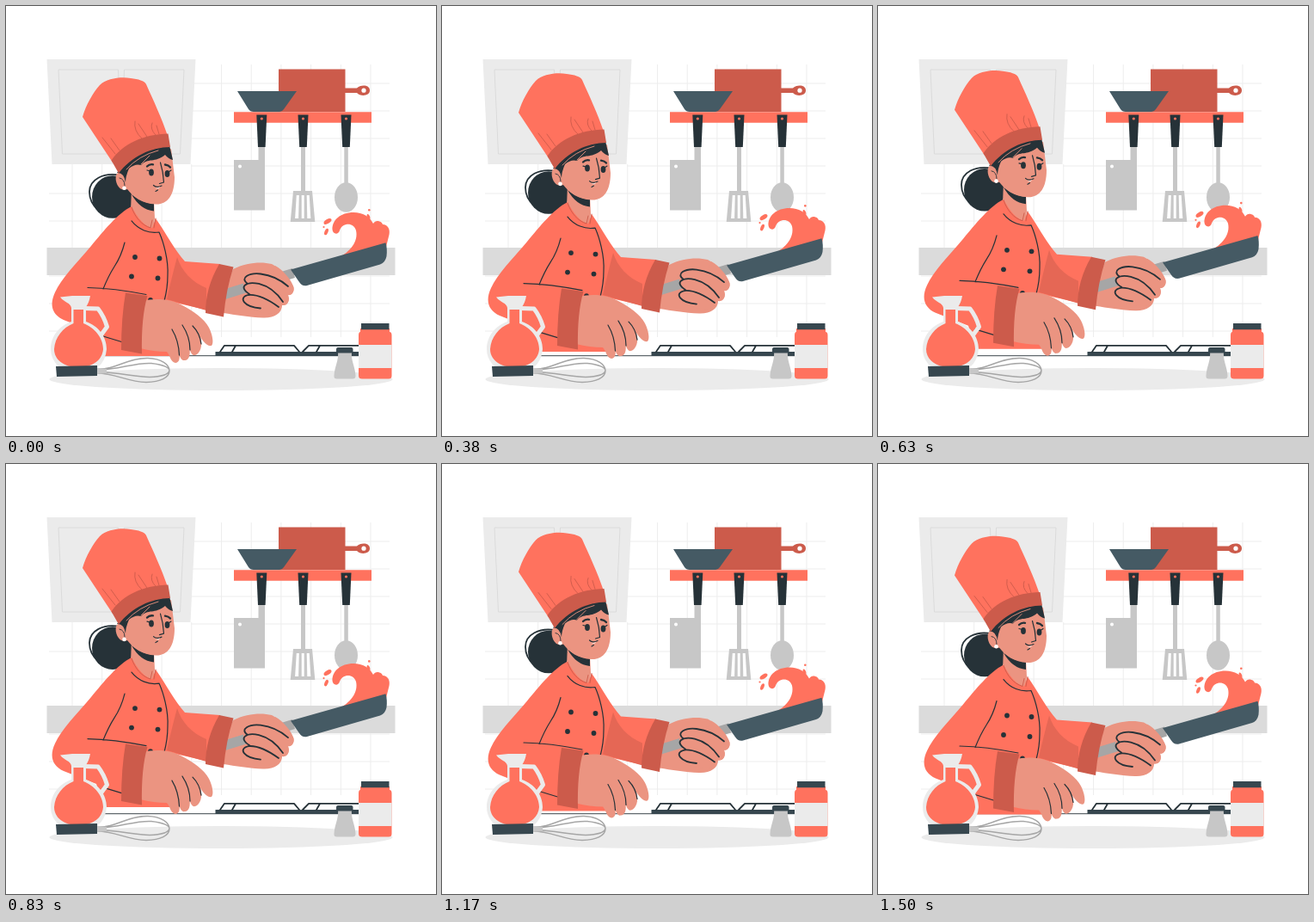
These frames come from a looping animation (500x500 px, 1540 ms). An HTML page:

```html
<!DOCTYPE html>
<html lang="en">
<head>
<meta charset="utf-8">
<title>Chef with a pan</title>
<style>
  html, body { margin: 0; width: 100%; height: 100%; overflow: hidden; background: #fff; }
  svg { display: block; width: 100vw; height: 100vh; }
  .red { fill: #ff725e; } .brick { fill: #cc5b4b; } .shade { fill: #e56755; }
  .skin { fill: #eb9481; } .ink { fill: #263238; } .slate { fill: #455a64; }
  .lid { fill: #37474f; } .pale { fill: #ebebeb; } .band { fill: #dbdbdb; }
  .steel { fill: #c7c7c7; } .white { fill: #fff; }
  .line { fill: none; stroke: #263238; stroke-width: 1.2; stroke-linecap: round; stroke-linejoin: round; }
  .bold { stroke-width: 1.8; }
  .seam { fill: none; stroke: #cc5b4b; stroke-width: .9; stroke-linecap: round; }
  .wire { fill: none; stroke: #a6a6a6; stroke-width: 1.5; }
</style>
</head>
<body>
<svg viewBox="0 0 500 500">
  <!-- wall -->
  <path id="tiles" fill="none" stroke="#ededed"/>
  <path class="band" d="M47.500 281h405v32h-405z"/>
  <path class="pale" d="M47.500 62H220.500L214.500 184H53.500z"/>
  <path fill="none" stroke="#dbdbdb" d="M61 74H130.500L134 172H65.500zM137.500 74H207L202.500 172H134z"/>

  <!-- shelf -->
  <path class="brick" d="M317 73.500h77.500v22H408C412 91 423 91 423 98S412 105.500 408 101H394.500v22H317z"/>
  <circle class="white" cx="416" cy="98.200" r="2.600"/>
  <path class="slate" d="M269 99H338L323 120Q321 123 318 123H288Q284 123 282 120z"/>
  <path class="red" d="M265 123.300h160v12.400h-160z"/>
  <path class="steel" d="M293.500 162H301V237.500H265V179H293.500zM343 162h5v53h8l3.300 36h-28.600l3.300-36h9zM393.300 162h4.500v45h-4.500z"/>
  <ellipse class="steel" cx="395.500" cy="222.500" rx="13.500" ry="17.200"/>
  <circle class="white" cx="272" cy="186.500" r="2"/>
  <path class="white" d="M337.800 220h3l-.7 27h-4zM343.700 220h3v27h-3zM349.700 220h3l1.600 27h-4z"/>
  <g id="grips"></g>

  <!-- counter -->
  <ellipse class="pale" cx="250" cy="434" rx="199.500" ry="13"/>
  <path class="line" stroke-linecap="butt" style="stroke-width:.9" d="M112 406.700H412"/>

  <g id="chef">
    <!-- bun and neck -->
    <ellipse class="ink" cx="124" cy="222" rx="24" ry="24.800"/>
    <path class="line bold" d="M133 197C113 193 97 202 97 216C97 225 101 232 107 237"/>
    <path class="skin" d="M146 212L172 226L173 247L171 262L160 258L145 238z"/>
    <path class="ink" d="M146 219Q158 229 172 230V238.500Q156 237 146 219z"/>

    <!-- jacket -->
    <path class="red" d="M146 233C130 241 113 262 99 279C82 299 64 317 57 333C50 348 54 359 67 365L105 380L113 407H190L188 343L232 353L249 300L208 297C197 285 186 264 174 247L170 258C161 256 153 247 146 233z"/>
    <path class="shade" d="M199 292C204 308 216 321 233 328V354L187 341Q192 318 199 292z"/>
    <path class="seam" d="M146 234C150 246 158 255 168 258L170 249M174 247L172 258"/>
    <path class="line" d="M146 250C154 260 166 265 178 263C183 274 189 295 188 313Q188 328 184 343M138 275Q134 291 126 303Q119 314 113 329M95 327.500C116 328 140 331 163 335.500M113 384L136 391"/>
    <g class="ink" id="buttons"></g>

    <!-- splash -->
    <path class="red" d="M386 293C400 286 410 274 407 261C404 251 391 252 388 261C386 267 380 265 379.500 260C379 249 389 240 404 240C415 240 423 245 427 253C430 247 438 251 438 254C444 254 447 260 445.500 266L442 280z"/>
    <g class="red">
      <ellipse cx="374" cy="250.500" rx="5" ry="2.500" transform="rotate(-32 374 250.500)"/>
      <ellipse cx="372.500" cy="262.500" rx="2" ry="4" transform="rotate(22 372.500 262.500)"/>
      <ellipse cx="421.500" cy="245" rx="1.600" ry="3.200" transform="rotate(-20 421.500 245)"/>
      <circle cx="422.300" cy="237.300" r="1.300"/>
      <circle cx="369.500" cy="257" r="1.100"/>
    </g>

    <!-- pan hand -->
    <path class="skin" d="M253 331L264 306C280 298 297 297 309 300C318 305 329 315 334 326C336 332 332 337 328 336C331 342 327 349 321 348C321 357 312 363 299 362.500C283 362 266 359 253 357z"/>
    <path fill="#a6a6a6" d="M255 329L333 305L336 316L255 341z"/>
    <path class="slate" d="M331 306.500L441.500 275.200Q443.500 282 442.500 291Q441 298.500 435 300.500L350 325Q344 326 341 321z"/>
    <path class="skin" d="M278 319C281 308 297 308 310 309L313 302C322 307 331 317 334.500 327C335.500 333 332 337 327 336C331 343 327 349 321 348C319 354 313 360 300 357C285 356 273 349 274 343C274 338 278 335 280 334C275 329 275 323 278 319z"/>
    <path class="line bold" d="M281 323C271 316 283 310 296 311.500C309 313 320 319 328 326M283 335C269 326 280 320 294 323C306 326 316 335 322 344M317 350C306 342 294 335 282 336C269 339 277 350 296 351.500"/>
    <path class="brick" d="M248 300L264.500 303.500Q256 329 253 361.500L232 357Q232 327 248 300z"/>

    <!-- resting hand -->
    <path class="skin" d="M158 343C176 339 193 341 205 348C217 354 231 364 236 374C240 382 242 392 239 395C234 396 230 391 226 385C229 395 226 404 220 406C216 407 214 402 213 396C215 405 213 412 208 412C204 413 202 408 201 403C203 410 201 415 197 415C191 414 191 406 187 402Q172 402 156 398z"/>
    <path class="line" d="M193 376C199 386 201 395 201.500 406M205 371C211 380 214 389 214 400M217 372C222 377 226 385 227 393"/>
    <path class="brick" d="M139 333.500L164.500 337Q157 362 158 404.500L134 400Q134 362 139 333.500z"/>

    <!-- head -->
    <path class="skin" d="M138 184L192 166L196 199C196 220 188 231 174 230.500C158 230 148 222 141 213C132 217 126 205 128 197C130 191 136 193 139 197z"/>
    <path class="ink" d="M129 194L145 172L190 162L194 179Q189 178 185 173C173 183 165 176 157 185Q150 183 143 189Q139 198 139 205Q137 193 129 194z"/>
    <path class="seam" style="stroke:#eb9481" d="M140 190Q154 174 177 168M157 184L167 174"/>
    <path class="line" style="stroke-width:.9" d="M132 200Q138 201 138 209"/>
    <circle class="white" cx="137.500" cy="211.800" r="2.300"/>
    <ellipse class="ink" cx="169" cy="193.500" rx="2.900" ry="4"/>
    <ellipse class="ink" cx="187.500" cy="195" rx="2.900" ry="4"/>
    <path class="line bold" style="stroke-width:2.300" d="M164 186.500Q167 183.500 171 184.300M185 184.500Q189 185 191 187.500"/>
    <path class="line" d="M164 191L168 192M189 193L192 191M179.500 182Q183 193 183.500 205L178.500 206.500M171.500 208.500Q175 212 181 209M174 215.500L176.500 214"/>
    <path class="white" d="M173 211Q177 212.500 179 210Q178 214 173 211z"/>

    <!-- hat -->
    <path class="red" d="M124 182L89 129C93 115 101 101 109 92C117 84 134 82 145 84C154 85 161 87 163 91C171 109 181 130 188 151z"/>
    <path class="brick" d="M122.500 179.500C136 160 160 149 188.500 148.500L191 164C169 164 146 175 131 194.500z"/>
    <path class="seam" d="M112 153L127 172M122 154L132 168M150 134Q148 145 158 154M154 137L164 152M170 136Q167 143 174 150M175 139L178 149"/>
  </g>

  <!-- hob -->
  <path class="lid" d="M243.500 402H412v5H243.500z"/>
  <path class="line bold" stroke-linecap="butt" d="M249 402L254 394.800H335L341 402M263 402L267 395M345 402L352 394.800H411M361 402L365 395"/>

  <!-- jar and shaker -->
  <path class="steel" d="M386 402H402C401 413 406 419 406.500 430Q406.500 433.500 403 433.500H385Q381 433.500 381.500 430C382 419 387 413 386 402z"/>
  <rect class="lid" x="384" y="397" width="19.500" height="6.500" rx="2"/>
  <path class="red" d="M412 375H446V379Q448.500 379 448.500 383V430Q448.500 433.500 445 433.500H414Q410 433.500 410 430V383Q410 379 412 379z"/>
  <path class="pale" d="M410 394h38.500v27H410z"/>
  <path class="lid" d="M413 369h32.500v7.200H413z"/>

  <!-- jug -->
  <path fill="none" stroke="#ebebeb" stroke-width="5" stroke-linejoin="round" d="M91 351.500L107 352Q114 361 117.500 373L108 386"/>
  <path class="pale" d="M63 338.500L77 337H98C97 343 95 347 93 350V367C107 372 117 384 117 399Q116 412 107 420H62Q52 411 52 399C52 384 62 372 76 367V351C75 345 68 345 63 338.500z"/>
  <path class="red" d="M78.500 353H90V369C103 374 113 386 113 399C112 411 102 420 84 420C67 420 56 411 56 399C57 385 66 374 78.500 369z"/>

  <!-- whisk -->
  <path class="wire" d="M106 422C128 423 141 409 165 409.500C181 410 190 417 190 424C190 432 180 437 163 437.500C141 437 127 427 106 427M106 423.500C132 423 151 414 169 415.500C184 417 190 421 190 424C189 428 181 431 167 431.500C149 431 131 426 106 425.500"/>
  <path class="steel" d="M105 420.500L117 422V427L105 428z"/>
  <path class="lid" d="M58 419L106 418V430L59 431z"/>
</svg>
<script>
  const byId = id => document.getElementById(id);

  let tiles = '';
  for (let i = 0; i < 11; i++) tiles += `M${77 + i * 34.7} ${i < 5 ? 184 : 68}V385`;
  for (let i = 0; i < 10; i++) tiles += `M${i < 4 ? 215 : 50} ${90 + i * 32}H446`;
  byId('tiles').setAttribute('d', tiles);

  byId('grips').innerHTML = [297.3, 345.5, 395.5].map(x =>
    `<path class="ink" d="M${x - 6} 126.500h12l-1.700 37.500h-8.600z"/><circle class="red" cx="${x}" cy="131" r="1.600"/>`).join('');

  byId('buttons').innerHTML = [[150, 292], [178.5, 293.5], [146, 314.5], [176.5, 316.5], [168, 342]].map(([x, y]) =>
    `<circle cx="${x}" cy="${y}" r="2.900"/>`).join('');

  const LOOP = 1540, LEAD = 50, RISE = 10, REST = 0.65;
  const chef = byId('chef');

  function draw() {
    const phase = ((performance.now() + LEAD) % LOOP) / LOOP;
    const lift = RISE * (1 - Math.abs(1 - 2 * phase));
    chef.setAttribute('transform', `translate(0 ${REST - lift})`);
    requestAnimationFrame(draw);
  }
  draw();
</script>
</body>
</html>
```
